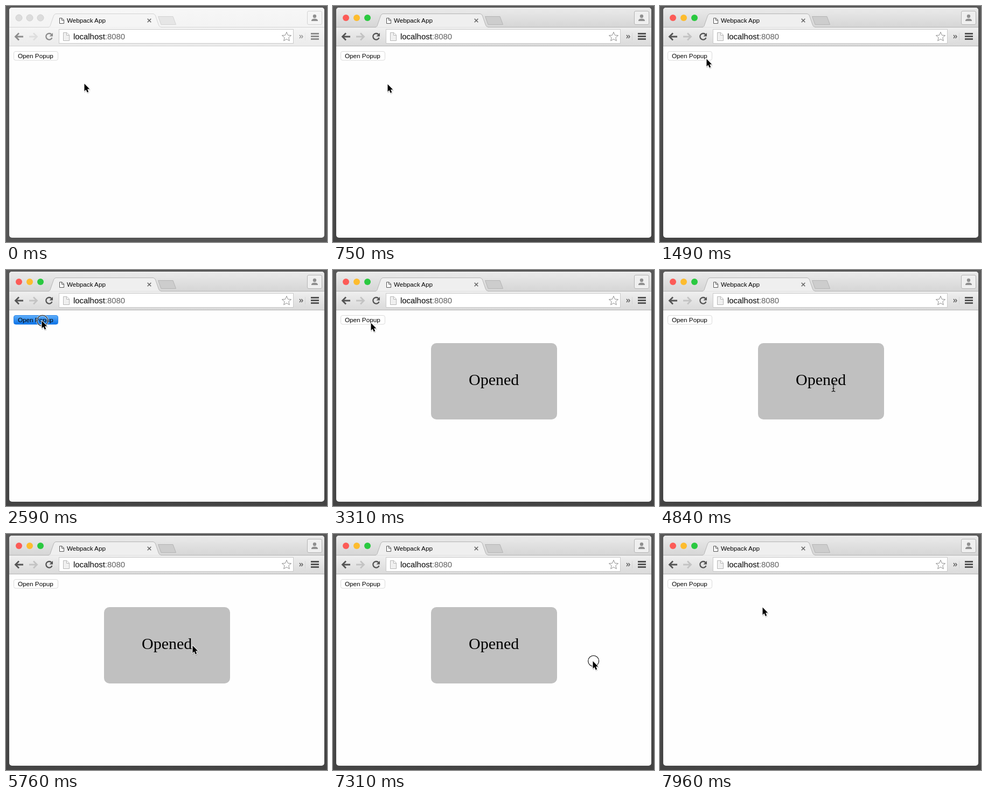
Recreate the animation shown at these times as an HTML page. Size 596 by 439 pixels, loop 8000 ms.

```html
<!DOCTYPE html>
<html lang="en">
<head>
<meta charset="utf-8">
<title>Popup demo</title>
<style>
  html, body { margin: 0; width: 100%; height: 100%; overflow: hidden; background: #555; }
  svg {
    display: block; width: 596px; height: 439px;
    --strip-top: #f7f7f7; --strip-end: #f3f3f3; --bar-top: #f5f5f5; --bar-end: #ebebeb;
    --line: #d3d3d3; --icon: #8d8d8d; --faint: #dedede; --plus: #e6e6e6;
    --red: #dcdcdc; --yellow: #dcdcdc; --green: #dcdcdc; --rim: #d0d0d0;
    --desk-end: #555;
  }
  svg.active {
    --strip-top: #ebebeb; --strip-end: #d5d5d5; --bar-top: #efefef; --bar-end: #dadada;
    --line: #b4b4b4; --icon: #555; --faint: #c3c3c3; --plus: #cdcdcd;
    --red: #fc5b57; --yellow: #fdbc2e; --green: #2ac940; --rim: none;
    --desk-end: #444;
  }
  text { font-family: "Liberation Sans", Arial, sans-serif; }
  .label { font-size: 11.7px; fill: #000; }
  .url { font-size: 14.9px; fill: #000; }
  .title { font: 30px "Liberation Serif", "Times New Roman", serif; }
  .line { fill: none; stroke: var(--icon); }
  .edge { stroke: var(--line); }
  .lights { stroke: var(--rim); }
</style>
</head>
<body>
<svg id="stage" viewBox="0 0 596 439">
  <defs>
    <linearGradient id="desk" x2="0" y2="1">
      <stop stop-color="#585858"/><stop offset="1" stop-color="var(--desk-end)"/>
    </linearGradient>
    <linearGradient id="strip" x2="0" y2="1">
      <stop stop-color="var(--strip-top)"/><stop offset="1" stop-color="var(--strip-end)"/>
    </linearGradient>
    <linearGradient id="bar" x2="0" y2="1">
      <stop stop-color="var(--bar-top)"/><stop offset="1" stop-color="var(--bar-end)"/>
    </linearGradient>
    <linearGradient id="pressed" x2="0" y2="1">
      <stop stop-color="#61b0fb"/><stop offset="1" stop-color="#0870e6"/>
    </linearGradient>
    <clipPath id="frame"><rect x="6" y="3" width="585" height="428" rx="5"/></clipPath>
    <path id="arrowShape" d="M0 0V14L3 11L5.3 16.2L7.7 15.1L5.5 10.1H9.8Z"/>
  </defs>

  <rect width="596" height="439" fill="url(#desk)"/>
  <g clip-path="url(#frame)">
    <rect width="596" height="439" fill="#fefefe"/>
    <rect x="6" y="3" width="585" height="37" fill="url(#strip)"/>
    <rect x="6" y="40" width="585" height="34" fill="url(#bar)"/>
    <path class="edge" d="M6 39.5H591M6 74.5H591"/>
    <path class="edge" fill="var(--bar-top)" d="M78 39.5C82 39 82 37 83 34L88.5 18Q90 14.5 93 14.5H273Q276 14.5 277.5 18L283 34C284 37 285 39 289 39.5"/>
    <path d="M80 40.5H287" stroke="var(--bar-top)" stroke-width="2"/>
    <path class="edge" fill="var(--plus)" stroke-linejoin="round" d="M282.5 19.5H310L315.500 34.5H288Z"/>
    <g class="lights">
      <circle cx="24" cy="22" r="6" fill="var(--red)"/>
      <circle cx="44" cy="22" r="6" fill="var(--yellow)"/>
      <circle cx="64" cy="22" r="6" fill="var(--green)"/>
    </g>
  </g>

  <path d="M99.500 22.500H104L107.500 26V32.500H99.500ZM103.500 22.500V26.500H107.500" fill="#fff" stroke="#555"/>
  <text class="label" x="113" y="31">Webpack App</text>
  <path d="M262.700 23.700l6.600 6.600m0 -6.600l-6.600 6.600" stroke="#666" stroke-width="1.600"/>

  <rect class="edge" x="559.5" y="9.5" width="27" height="25" rx="2.5" fill="var(--bar-top)"/>
  <g fill="#909090">
    <circle cx="573" cy="19" r="3.2"/>
    <path d="M567 28V26.5Q568 23.5 573 23.5T579 26.5V28Z"/>
  </g>

  <g stroke-width="2.8">
    <path class="line" d="M18 57H32M24 50.5L17.5 57L24 63.5"/>
    <path class="line" style="stroke:var(--faint)" d="M43 57H57M51 50.5L57.5 57L51 63.5"/>
    <path class="line" stroke-width="2.3" d="M84.5 53A5.8 5.8 0 1 0 85.5 59"/>
    <path fill="var(--icon)" stroke="none" d="M87 50V56.5H80.5Z"/>
  </g>
  <rect x="98.5" y="43.5" width="435" height="26" fill="#fff" stroke="#c9c9c9"/>
  <path d="M106.500 49.500H113L117.500 54V64.500H106.500ZM112.500 49.500V54.500H117.500" fill="#f0f0f0" stroke="#b5b5b5"/>
  <text class="url" x="125" y="62">localhost<tspan fill="#606060">:8080</tspan></text>
  <path id="star" fill="#fff" stroke="#909090"/>
  <path class="line" stroke-width="1.3" d="M545 54l2.500 3l-2.500 3m3.500 -6l2.500 3l-2.500 3"/>
  <path class="edge" opacity=".3" d="M555.500 50V64"/>
  <path class="line" stroke-width="3" d="M566 51.500h15m-15 5h15m-15 5h15"/>

  <rect id="button" x="14.500" y="84.500" width="82" height="16.500" rx="3.500"/>
  <text class="label" x="22" y="97">Open Popup</text>

  <g id="popup">
    <rect x="182" y="136" width="234" height="142" rx="10" fill="#c0c0c0"/>
    <rect id="selection" x="252" y="186" width="93" height="35" fill="#a9c8ea"/>
    <text class="title" x="252" y="214">Opened</text>
  </g>

  <g id="pointer">
    <g id="ring" fill="none">
      <circle cx="1.700" cy=".200" r="10" stroke="#fff" stroke-width="3" opacity=".7"/>
      <circle cx="1.700" cy=".200" r="10" stroke="#000" stroke-width="1.100"/>
    </g>
    <g id="arrow" stroke-linejoin="round">
      <use href="#arrowShape" y="2" x="1" stroke="#000" stroke-width="2" opacity=".16"/>
      <use href="#arrowShape" y=".5" x=".5" stroke="#fff" stroke-width="1.800" paint-order="stroke"/>
    </g>
    <path id="beam" d="M-3.500 -8Q0 -8 0 -6Q0 -8 3.500 -8M0 -6V6M-3.500 8Q0 8 0 6Q0 8 3.500 8M-2 2.500H2" fill="none" stroke="#111" stroke-width="1.200"/>
  </g>
</svg>
<script>
  const LOOP = 8000, FRAME = 57, CLICK = 180;
  const ACTIVATED = 750;
  const OPENED = 2770, CLOSED = 7370;
  const SELECTED = 5910, DESELECTED = 6505;
  const clicks = [2590, 5040, 5580, DESELECTED, 7310];

  // Each move starts where the last one ended; "via" bends its path.
  const home = [145, 144];
  const moves = [
    { start: 60, end: 170, to: [101, 145] },
    { start: 980, end: 1490, to: [86, 98], via: [40, 100] },
    { start: 1550, end: 1720, to: [166, 72] },
    { start: 1830, end: 2260, to: [66, 94], via: [50, 60] },
    { start: 3310, end: 3880, to: [237, 213], via: [140, 165] },
    { start: 3940, end: 3990, to: [254, 205] },
    { start: 4170, end: 4490, to: [279, 209] },
    { start: 4730, end: 4960, to: [366, 227] },
    { start: 5400, end: 5560, to: [346, 207] },
    { start: 6450, end: 6505, to: [338, 207] },
    { start: 6980, end: 7260, to: [482, 236] },
    { start: 7730, end: 7960, to: [190, 136] }
  ];

  const el = id => document.getElementById(id);
  const show = (id, on) => el(id).setAttribute('visibility', on ? 'visible' : 'hidden');
  const within = (t, from, to) => t >= from && t < to;
  const mix = (a, b, p) => a.map((v, i) => v + (b[i] - v) * p);
  const ease = p => p * p * (3 - 2 * p);

  function pointerAt(t) {
    const i = moves.filter(move => move.start <= t).length - 1;
    if (i < 0) return home;
    const { start, end, to, via } = moves[i];
    const from = i ? moves[i - 1].to : home;
    const elapsed = (Math.floor((t - start) / FRAME) + 1) * FRAME;
    const p = ease(Math.min(1, elapsed / (end - start)));
    return via ? mix(mix(from, via, p), mix(via, to, p), p) : mix(from, to, p);
  }

  function render(t) {
    const [x, y] = pointerAt(t).map(Math.round);
    const isOpen = within(t, OPENED, CLOSED);
    const isPressed = within(t, clicks[0], OPENED);
    const overText = isOpen && within(x, 251, 345) && within(y, 187, 222);
    el('stage').classList.toggle('active', t >= ACTIVATED);
    el('button').setAttribute('fill', isPressed ? 'url(#pressed)' : '#fff');
    el('button').setAttribute('stroke', isPressed ? '#2482ea' : '#dadada');
    el('popup').style.display = isOpen ? '' : 'none';
    el('selection').style.display = within(t, SELECTED, DESELECTED) ? '' : 'none';
    show('ring', clicks.some(click => within(t, click, click + CLICK)));
    show('arrow', !overText);
    show('beam', overText);
    el('pointer').setAttribute('transform', `translate(${x} ${y})`);
  }

  const star = Array.from({ length: 10 }, (_, i) => {
    const r = i % 2 ? 4 : 9, a = (i / 5 - .5) * Math.PI;
    return `${521 + r * Math.cos(a)} ${57.5 + r * Math.sin(a)}`;
  });
  el('star').setAttribute('d', `M${star.join('L')}Z`);

  const origin = performance.now();
  function tick() {
    render((performance.now() - origin) % LOOP);
    requestAnimationFrame(tick);
  }
  tick();
</script>
</body>
</html>
```
